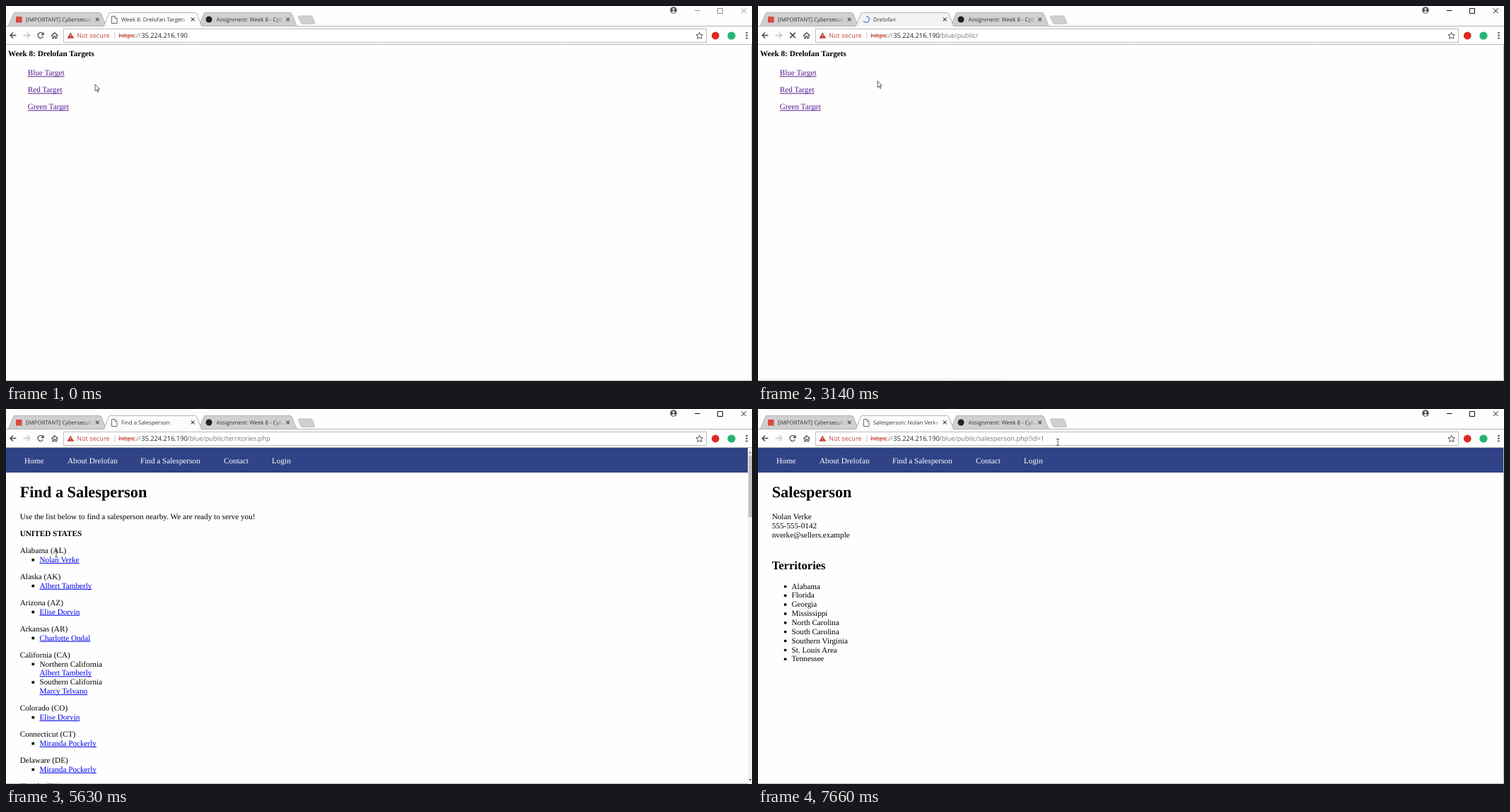
Recreate the animation shown at these times as an HTML page with a canvas. Size 1055 by 531 pixels, loop 8 s.

```html
<!DOCTYPE html>
<html lang="en">
<head>
<meta charset="utf-8">
<title>Browser walkthrough</title>
<style>
html, body { margin: 0; width: 100%; height: 100%; overflow: hidden; background: #fefefe; }
canvas { display: block; }
</style>
</head>
<body>
<canvas id="stage" width="1055" height="531"></canvas>
<script>
const ctx = document.getElementById('stage').getContext('2d');
const LOOP = 8000, LINE = 12.86;
const UI = '"Open Sans", "Noto Sans", sans-serif';
const SERIF = '"Liberation Serif", "Times New Roman", serif';
const BODY = `11.2px ${SERIF}`, BOLD = `bold ${BODY}`;
const H1 = `bold 22.3px ${SERIF}`, H2 = `bold 16.6px ${SERIF}`;

// Bursts of screen updates: start, end, count
const bursts = [
  [260, 1110, 7], [2040, 2990, 8], [3140, 4140, 8], [4260, 5230, 8],
  [5360, 6310, 8], [6430, 7390, 8], [7660, 7660, 1]
];

// Pointer path: time, x, y
const path = [
  [0, 126, 111], [260, 120, 106], [685, 84, 81], [970, 66, 94], [1110, 62, 96],
  [2180, 62, 96], [2450, 120, 165], [2583, 150, 180], [2990, 170, 110], [3140, 169, 106],
  [3420, 185, 95], [3850, 219.5, 73], [4800, 219.5, 73], [4950, 200, 90],
  [5360, 110, 165], [5631, 71, 205], [5900, 82, 211], [6310, 85, 211],
  [6567, 288, 162], [6850, 400, 70], [7250, 425, 48], [7390, 425, 48], [7660, 424, 47]
];

// Each entry changes part of the browser state from its time on
const changes = [
  [0, { page: targets, title: 'Week 8: Drelofan Targets', url: '', pointer: 'arrow', tab: '#fcfcfc' }],
  [960, { pointer: 'hand', status: true }],
  [2040, { focused: true }],
  [2170, { loading: 'blue', tab: '#f3f3f3', title: 'https://35.224.216.190/blue', url: '/blue/public/' }],
  [2300, { pointer: 'arrow' }],
  [2700, { title: 'Drelofan' }],
  [3280, { page: home, loading: '', status: false, tab: '#fcfcfc' }],
  [3700, { pointer: 'hand', status: true }],
  [4390, { loading: 'pale', title: 'https://35.224.216.190/blue', url: '/blue/public/territories.php' }],
  [4800, { page: finder, title: 'Find a Salesperson', loading: '', status: false }],
  [4940, { pointer: 'arrow' }],
  [5350, { pointer: 'beam' }],
  [5890, { pointer: 'hand', status: true }],
  [6170, { loading: 'pale' }],
  [6430, { title: 'Salesperson: Nolan Verke', url: '/blue/public/salesperson.php?id=1' }],
  [6690, { page: person, loading: '', status: false }],
  [6830, { pointer: 'arrow' }],
  [7100, { pointer: 'beam' }]
];

const states = [
  ['Alabama (AL)', '>Nolan Verke'],
  ['Alaska (AK)', '>Albert Tamberly'],
  ['Arizona (AZ)', '>Elise Dorvin'],
  ['Arkansas (AR)', '>Charlotte Ondal'],
  ['California (CA)', 'Northern California', '>Albert Tamberly', 'Southern California', '>Marcy Telvano'],
  ['Colorado (CO)', '>Elise Dorvin'],
  ['Connecticut (CT)', '>Miranda Pockerly'],
  ['Delaware (DE)', '>Miranda Pockerly'],
  ['Florida (FL)']
];

const pointers = {
  arrow: new Path2D('M0 0V9.3L2.1 7.4 3.6 10.8 5 10.2 3.5 6.9H6.4Z'),
  hand: new Path2D('M-1 .6Q0-.4 1 .6V5L4 5.6Q5 6 5 7.5V9.5L4 12.5H-.5L-3.5 8.5Q-3.6 7-2.3 7.2L-1 8.5Z'),
  beam: new Path2D('M-2-4.5h4M0-4.5v9M-2 4.5h4')
};

function text(str, x, y, font = BODY, color = '#000') {
  ctx.font = font;
  ctx.fillStyle = color;
  ctx.fillText(str, x, y);
}

function rect(x, y, w, h, color) {
  ctx.fillStyle = color;
  ctx.fillRect(x, y, w, h);
}

function dot(x, y, r, color) {
  ctx.fillStyle = color;
  ctx.beginPath();
  ctx.arc(x, y, r, 0, 7);
  ctx.fill();
}

function line(d, color, width = 1) {
  ctx.strokeStyle = color;
  ctx.lineWidth = width;
  ctx.stroke(new Path2D(d));
}

function shape(d, fill, stroke) {
  ctx.fillStyle = fill;
  ctx.fill(new Path2D(d));
  if (stroke) line(d, stroke);
}

function arc(x, y, r, from, to, color, width) {
  ctx.strokeStyle = color;
  ctx.lineWidth = width;
  ctx.beginPath();
  ctx.arc(x, y, r, from, to);
  ctx.stroke();
}

function link(str, x, y, color = '#0000ee') {
  text(str, x, y, BODY, color);
  rect(x, y + 1, ctx.measureText(str).width, 1, color);
}

const cross = (x, y, r, color, width) =>
  line(`M${x - r} ${y - r}l${2 * r} ${2 * r}m0 ${-2 * r}l${-2 * r} ${2 * r}`, color, width);

function targets() {
  text('Week 8: Drelofan Targets', 3, 70.5, BOLD);
  ['Blue', 'Red', 'Green'].forEach((c, i) => link(c + ' Target', 30.7, 98.4 + 24 * i, '#551a8b'));
}

function site(heading, width = 1054) {
  rect(0, 55, width, 35, '#304386');
  [['Home', 26], ['About Drelofan', 87], ['Find a Salesperson', 190], ['Contact', 308], ['Login', 376]]
    .forEach(([label, x]) => text(label, x, 76.7, BODY, '#fff'));
  text(heading, 19.7, 125, H1);
}

function home() {
  site('Welcome to Drelofan!');
  [
    'Drelofan is a world-wide industry leader with many award-winning products',
    'which have become well-known household names. Our staff of experts are',
    'dedicated to finding synergies across a wide variety of vertical markets and',
    'integrating technology into everyday life.'
  ].forEach((s, i) => text(s, 19.7, 156 + LINE * i));
}

function finder() {
  site('Find a Salesperson', 1049);
  text('Use the list below to find a salesperson nearby. We are ready to serve you!', 19.7, 156);
  text('UNITED STATES', 19.7, 180, BOLD);
  let y = 204;
  for (const [state, ...rows] of states) {
    text(state, 19.7, y);
    rows.forEach((row, i) => {
      y += LINE;
      if (i % 2 === 0) rect(36.5, y - 5, 3.6, 3.6, '#000');
      if (row[0] === '>') link(row.slice(1), 47.5, y);
      else text(row, 47.5, y);
    });
    y += 24.05;
  }
  rect(1049, 55, 6, 476, '#f1f1f1');
  rect(1050, 66, 5, 87, '#c1c1c1');
  shape('M1050.5 63l2-2.5 2 2.5Z', '#777');
  shape('M1050.5 524l2 2.5 2-2.5Z', '#444');
}

function person() {
  site('Salesperson');
  ['Nolan Verke', '555-555-0142', 'nverke@sellers.example']
    .forEach((s, i) => text(s, 19.7, 156 + LINE * i));
  text('Territories', 19.7, 226.5, H2);
  ['Alabama', 'Florida', 'Georgia', 'Mississippi', 'North Carolina', 'South Carolina',
    'Southern Virginia', 'St. Louis Area', 'Tennessee'].forEach((s, i) => {
    const y = 254.5 + LINE * i;
    dot(38.6, y - 3.2, 1.9, '#000');
    text(s, 47.5, y);
  });
}

function tab(x, title, fill) {
  shape(`M${x} 28.5q1.5 0 2-1.5l6-15q.8-2.5 2.5-2.5h120q1.7 0 2.5 2.5l6 15q.5 1.5 2 1.5`, fill, '#b0b0b0');
  const fade = ctx.createLinearGradient(x + 110, 0, x + 120, 0);
  fade.addColorStop(0, '#333');
  fade.addColorStop(1, '#3330');
  text(title, x + 26, 22, `7.85px ${UI}`, fade);
  cross(x + 127.2, 19, 2.4, '#444', 1.1);
}

function tabIcon(s, t) {
  if (s.loading === 'blue') {
    const a = (t - 3140) / 220;
    arc(153, 19, 4.4, a - 1.6, a + 2.6, '#4a86e8', 1.4);
  } else if (s.loading) {
    arc(153, 19, 4.4, -1.6, 1.1, '#7f93bd', 1.3);
  } else {
    shape('M149.5 14.5h4.5l3 3v7h-7.5Z', '#fff', '#666');
    line('M153.8 14.5v3h3', '#666', .8);
  }
}

function toolbar(s) {
  rect(0, 29, 1055, 25, '#fdfdfd');
  line('M0 28.5H139M276 28.5H1055', '#b4b4b4');
  line('M0 54.5H1055', '#b8b8b8');
  line('M14.5 41.5H6.5M10 37.5l-4 4 4 4', '#444', 1.3);
  line('M25 41.5h8M30 37.5l4 4-4 4', '#c4c4c4', 1.3);
  if (s.loading) {
    cross(49, 41.5, 3.8, '#333', 1.4);
  } else {
    arc(49, 41.5, 3.9, .5, 5.5, '#444', 1.3);
    shape('M53.6 37v4.2h-4.2Z', '#444');
  }
  line('M64.3 42l4.5-4.2 4.5 4.2M65.8 41.5v4.3h2v-3h2v3h2v-4.3', '#444', 1.1);

  rect(81.5, 32.5, 909, 19, '#fff');
  line('M81.5 32.5h909v19h-909Z', '#bcbcbc');
  shape('M91.3 37.5l4.8 8.3h-9.6Z', '#cb3426');
  rect(90.9, 40.3, .9, 2.6, '#fff');
  rect(90.9, 43.8, .9, .9, '#fff');
  const font = `9.25px ${UI}`;
  text('Not secure', 100, 45, font, '#c5463a');
  rect(153.5, 37, 1, 10, '#c8c8c8');
  text('https', 159.5, 45, font, '#c5463a');
  rect(159, 41.7, 22.5, 1, '#c5463a');
  text('://', 181.5, 45, font, '#777');
  text('35.224.216.190', 191.2, 45, font, '#222');
  text(s.url, 256, 45, font, '#777');

  line('M980.7 37.3l1.4 3.2 3.4.3-2.6 2.3.8 3.4-3-1.8-3 1.8.8-3.4-2.6-2.3 3.4-.3Z', '#444', .9);
  dot(1003.3, 42, 5.4, '#dc2b23');
  dot(1026, 42, 5.6, '#23b573');
  for (const y of [38, 41.7, 45.4]) dot(1047.5, y, 1.2, '#444');
}

function windowButtons(focused) {
  const color = focused ? '#111' : '#8c8c8c';
  dot(944, 6, 4.8, '#555');
  dot(944, 4.6, 1.5, '#fff');
  shape('M941 8.6q3-2.6 6 0-3 2.4-6 0Z', '#fff');
  line('M974 6.5h7.5M1006.5 3.5h7v7h-7Z', color);
  cross(1043.3, 6.7, 3.4, color, 1);
}

function drawPointer(kind, x, y) {
  ctx.save();
  ctx.translate(x, y);
  ctx.lineWidth = .8;
  ctx.strokeStyle = '#333';
  ctx.fillStyle = '#fff';
  if (kind !== 'beam') ctx.fill(pointers[kind]);
  ctx.stroke(pointers[kind]);
  ctx.restore();
}

function tick(t) {
  let shown = 0;
  for (const [start, end, count] of bursts) {
    if (t < start) break;
    const step = (end - start) / (count - 1) || 1;
    shown = start + step * Math.min(count - 1, Math.floor((t - start) / step + .2));
  }
  return shown;
}

function pointerAt(t) {
  const i = path.findIndex(p => p[0] >= t);
  if (i < 1) return path[0].slice(1);
  const [t0, x0, y0] = path[i - 1], [t1, x1, y1] = path[i];
  const k = (t - t0) / (t1 - t0);
  return [x0 + (x1 - x0) * k, y0 + (y1 - y0) * k];
}

function draw(t) {
  const s = Object.assign({}, ...changes.filter(c => c[0] <= t).map(c => c[1]));
  rect(0, 0, 1055, 531, '#fefefe');
  windowButtons(s.focused);
  tab(2, '[IMPORTANT] Cybersecurity', '#d0d0d0');
  rect(14, 15, 8.5, 8.5, '#d84a3e');
  tab(271.5, 'Assignment: Week 8 - Cyber', '#d0d0d0');
  dot(287, 19, 4.5, '#222');
  shape('M415 14h16q1.5 0 2 1l3.5 8.5q.5 2-1 2h-16q-1.5 0-2-1l-4-8.5q-.5-2 1.5-2Z', '#d0d0d0', '#bdbdbd');
  toolbar(s);
  tab(137, s.title, s.tab);
  tabIcon(s, t);
  line('M1054.5 55V531M0 530.5H1055', '#bdbdbd');
  s.page();
  if (s.status) {
    rect(0, 528, 350, 2, '#f9f9f9');
    line('M0 527.5H349.5V530', '#eee');
  }
  drawPointer(s.pointer, ...pointerAt(t));
}

ctx.textRendering = 'geometricPrecision';
const begin = performance.now();
function frame() {
  draw(tick((performance.now() - begin) % LOOP));
  requestAnimationFrame(frame);
}
frame();
</script>
</body>
</html>
```
